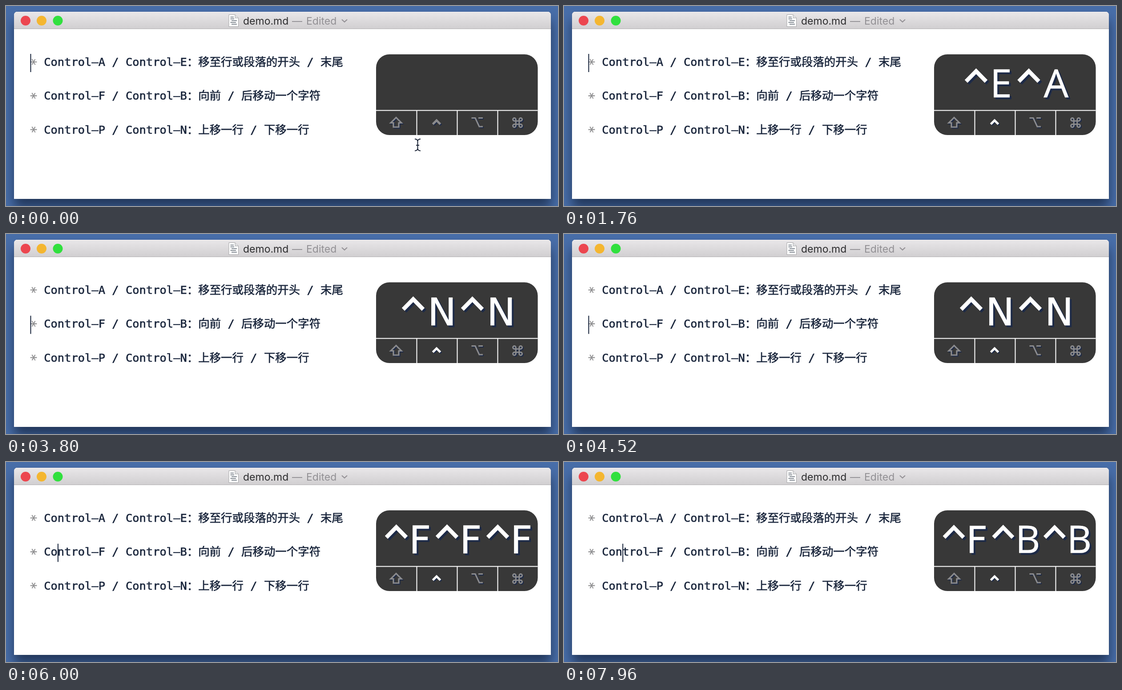
An HTML page for the animation above (8 s loop, 1241 px wide and 451 px high).

```html
<!DOCTYPE html>
<html lang="zh-CN">
<head>
<meta charset="utf-8">
<title>demo.md</title>
<style>
  html, body { margin: 0; width: 100%; height: 100%; overflow: hidden; background: #486ea9; }
  body { position: relative; }
  svg { position: absolute; left: 0; top: 0; display: block; }
  .window, .shadow { position: absolute; left: 18px; top: 13px; width: 1206.500px; height: 421.500px; }
  .window { border-radius: 7px 7px 0 0; background: #fff; overflow: hidden; }
  .shadow {
    border-radius: 7px;
    box-shadow: 0 0 1px #1c2c48, 0 20px 26px rgba(10, 20, 40, .6);
  }
  .bar {
    height: 38px; border-bottom: 1.5px solid #b3b1b3;
    background: linear-gradient(#e9e7e9, #d1cfd1); box-shadow: inset 0 1px #f4f3f4;
  }
  .title { font: 23px Inter, sans-serif; fill: #2c2c2e; }
  .title .dim { fill: #929094; }
  .doc text {
    font: 25.45px "DejaVu Sans Mono", "Noto Sans CJK SC", "Noto Sans CJK", monospace;
    fill: #1a263c; stroke: #1a263c; stroke-width: .65px; white-space: pre;
  }
  .doc .star { font-size: 30px; fill: #8f8f91; stroke: #8f8f91; stroke-width: .4px; text-anchor: middle; }
  .keys text { fill: #fff; stroke: #fff; stroke-width: .7px; }
  .keys path { fill: none; stroke: #fff; stroke-width: 9; }
  .keys { filter: drop-shadow(4px 4px .6px #1d2a47); }
  .mods { fill: none; stroke: #8b8b8d; stroke-width: 3.2; filter: drop-shadow(2px 2px .6px #1d2a47); }
</style>
</head>
<body>
<div class="shadow"></div>
<div class="window"><div class="bar"></div></div>
<svg width="1241" height="451" viewBox="0 0 1241 451">
  <circle cx="44" cy="33" r="11" fill="#ec464f"/>
  <circle cx="80" cy="33" r="11" fill="#f4b630"/>
  <circle cx="116.500" cy="33" r="11" fill="#31e03e"/>

  <path d="M501 19.500H515L522.500 27V46.500H501Z" fill="#fff" stroke="#a2a2a4"/>
  <path d="M515 19.500V27H522.500" fill="#e2e2e4" stroke="#a2a2a4"/>
  <path d="M504.500 25H512M504.500 29H513M507 33H519M504.500 37H517M507 41H519" stroke="#5c6670" stroke-width="1.600"/>
  <g class="title">
    <text x="533" y="42">demo.md</text>
    <text class="dim" x="643" y="42">—</text>
    <text class="dim" x="675" y="42">Edited</text>
  </g>
  <path d="M755 30.500L761 36L767 30.500" fill="none" stroke="#929094" stroke-width="2.200"/>

  <g class="doc" id="doc"></g>
  <rect id="caret" width="2" height="41" fill="#16223a"/>

  <path d="M832 235V139a30 30 0 0 1 30-30H1165.500a30 30 0 0 1 30 30V261a30 30 0 0 1-30 30H862a30 30 0 0 1-30-30Z" fill="#383838"/>
  <path d="M832 235.500H1195.500M923.500 235V291M1014.500 235V291M1105.500 235V291" stroke="#fff" stroke-width="2"/>
  <g class="mods">
    <path d="M877 251.500L889 263.500H883V273H871V263.500H865Z"/>
    <path id="ctrl" d="M959.500 266.500L968 258L976.500 266.500" stroke-width="5"/>
    <path d="M1046.500 252.500H1055L1064 272H1072M1062 252.500H1072"/>
    <path transform="translate(1150 263) scale(.95)" d="M-4-7.500a3.500 3.500 0 1 0-3.500 3.500H7.500a3.500 3.500 0 1 0-3.500-3.500V7.500a3.500 3.500 0 1 0 3.500-3.500H-7.500a3.500 3.500 0 1 0 3.500 3.500Z"/>
  </g>
  <g class="keys"><g id="keys"></g></g>

  <path id="pointer" d="M919 300Q925 300 925.500 305Q926 300 932 300M925.500 304V322M919 326.500Q925 326.500 925.500 321Q926 326.500 932 326.500M922 314H929" fill="none" stroke="#1b2436" stroke-width="2"/>
</svg>
<script>
const LOOP = 8000, CELL = 15.35, LINE = 76.3, LEFT = 54.5;
const CENTER_X = 1013.5, CENTER_Y = 174, FIT = 342, HAT = 66.5;
const CTRL_DOWN = 480, LINE_END = 704, KEEP = 1100;

const lines = [
  "Control–A / Control–E：移至行或段落的开头 / 末尾",
  "Control–F / Control–B：向前 / 后移动一个字符",
  "Control–P / Control–N：上移一行 / 下移一行",
];

// Caret offset (px) and row after each key press
const presses = [
  { at: 760, key: "E", x: LINE_END, row: 0 },
  { at: 1440, key: "A", x: 0, row: 0 },
  { at: 3280, key: "N", x: 0, row: .5 },
  { at: 3640, key: "N", x: 0, row: 1 },
];
for (let col = 1; col <= 7; col++)
  presses.push({ at: 4660 + 300 * col, key: "F", x: col * CELL, row: 1 });
presses.push({ at: 7360, key: "B", x: 6 * CELL, row: 1 }, { at: 7720, key: "B", x: 5 * CELL, row: 1 });

const wide = "86px 'DejaVu Sans', sans-serif", narrow = "88px 'Open Sans', sans-serif";
const letters = {
  E: { advance: 52, dx: 0, font: narrow },
  A: { advance: 59, dx: 2, font: narrow },
  N: { advance: 66.5, dx: 1, font: wide },
  F: { advance: 47.5, dx: -3, font: wide },
  B: { advance: 52.4, dx: -3, font: narrow },
};

const el = id => document.getElementById(id);

el("doc").innerHTML = lines.map((line, i) => {
  const y = 135 + i * LINE;
  return `<text class="star" y="15.5" transform="translate(62 ${y - 9}) rotate(30)">*</text>
    <text x="${LEFT + 2 * CELL}" y="${y}">${line}</text>`;
}).join("");

function drawKeys(keys) {
  let x = 0, out = "";
  for (const key of keys) {
    const { advance, dx, font } = letters[key];
    out += `<path d="M${x + 12.5} 170l22.500-23l22.500 23"/>
      <text x="${x + HAT + dx}" y="206" style="font:${font}">${key}</text>`;
    x += HAT + advance;
  }
  const scale = x ? Math.min(1, FIT / x) : 1;
  el("keys").setAttribute("transform",
    `translate(${CENTER_X} ${CENTER_Y}) scale(${scale}) translate(${-x / 2} ${-CENTER_Y})`);
  el("keys").innerHTML = out;
}

// Keys typed since the last pause, at most three
function recentKeys(done, time) {
  if (!done.length || time - done[done.length - 1].at > KEEP) return "";
  let start = done.length - 1;
  while (start > 0 && done[start].at - done[start - 1].at < KEEP) start--;
  return done.slice(start).slice(-3).map(p => p.key).join("");
}

let shown = null;
function frame() {
  const time = performance.now() % LOOP;
  const done = presses.filter(p => p.at <= time);
  const { x, row } = done[done.length - 1] || { x: 0, row: 0 };
  el("caret").setAttribute("x", LEFT + x);
  el("caret").setAttribute("y", 108 + row * LINE);
  el("ctrl").style.stroke = time >= CTRL_DOWN ? "#fff" : "";
  el("pointer").style.display = done.length ? "none" : "";
  const keys = recentKeys(done, time);
  if (keys !== shown) drawKeys(shown = keys);
  requestAnimationFrame(frame);
}
frame();
</script>
</body>
</html>
```
